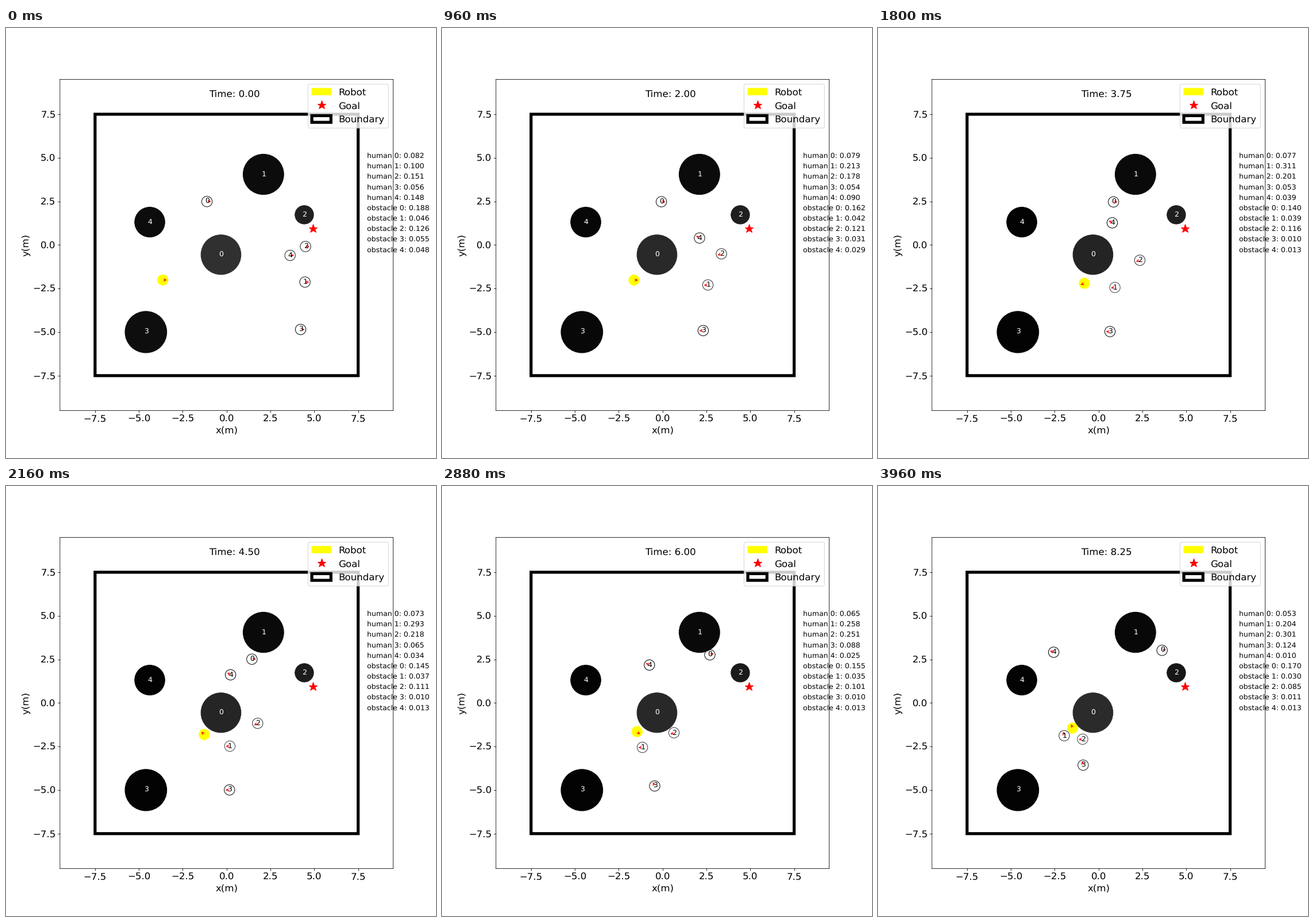
A matplotlib script that plays this animation: 748x748 px, repeating every 4080 ms.

```python
import numpy as np
import matplotlib.pyplot as plt
from matplotlib.animation import FuncAnimation
from matplotlib.lines import Line2D
from matplotlib.patches import ArrowStyle, Circle, FancyArrowPatch, Rectangle

FRAMES, INTERVAL, DT = 34, 120, 0.25
RADIUS = 0.3
LABEL_SHIFT = 0.11

# Steps at which the walkers' waypoints and the attention weights are given
TURNS = [0, 15, 21, 27, 33]
SCORE_STEPS = [0, 15, 33]

# The robot drives right, backs off, then hesitates beside obstacle 0
ROBOT_STEPS = [0, 13, 15, 18, 21, 27, 33]
ROBOT_PATH = [(-3.64, -2.01), (-0.37, -2.02), (-0.81, -2.2), (-1.27, -1.81),
              (-1.56, -1.54), (-1.35, -1.75), (-1.48, -1.44)]

# Waypoints in metres, then attention weights
HUMANS = [
    ([(-1.12, 2.49), (0.85, 2.47), (2.04, 2.55), (3.35, 2.97), (3.62, 3.02)],
     (.082, .077, .053)),
    ([(4.47, -2.13), (0.93, -2.44), (-0.56, -2.52), (-1.74, -2.58), (-1.96, -1.88)],
     (.100, .311, .204)),
    ([(4.50, -0.09), (2.35, -0.88), (1.19, -1.46), (0.11, -1.96), (-0.91, -2.08)],
     (.151, .201, .301)),
    ([(4.22, -4.85), (0.65, -4.97), (-0.32, -5.01), (-0.58, -4.52), (-0.88, -3.57)],
     (.056, .053, .124)),
    ([(3.62, -0.60), (0.78, 1.27), (-0.33, 1.96), (-1.17, 2.39), (-2.56, 2.91)],
     (.148, .039, .010)),
]

# x, y, radius, then attention weights
OBSTACLES = [
    ((-0.32, -0.56, 1.14), (.188, .140, .170)),
    ((2.10, 4.05, 1.16), (.046, .039, .030)),
    ((4.43, 1.73, 0.53), (.126, .116, .085)),
    ((-4.60, -5.00, 1.19), (.055, .010, .011)),
    ((-4.38, 1.31, 0.86), (.048, .013, .013)),
]


class Track:
    """Straight legs between waypoints."""

    def __init__(self, steps, points):
        self.steps = steps
        self.xs, self.ys = zip(*points)

    def position(self, step):
        return np.array([np.interp(step, self.steps, self.xs),
                         np.interp(step, self.steps, self.ys)])

    def heading(self, step):
        """Unit vector of the last move; everyone starts facing right."""
        if step == 0:
            return np.array([1.0, 0.0])
        move = self.position(step) - self.position(step - 1)
        return move / np.hypot(*move)


plt.rcParams["font.family"] = "DejaVu Sans"
plt.rcParams["text.hinting"] = "none"
fig, ax = plt.subplots(figsize=(10, 10), dpi=74.8)
fig.subplots_adjust(left=0.1255, right=0.9005, bottom=0.1105, top=0.8805)
ax.set(xlim=(-9.5, 9.5), ylim=(-9.5, 9.5))
ticks = np.arange(-7.5, 7.6, 2.5)
ax.set_xticks(ticks)
ax.set_yticks(ticks)
ax.tick_params(labelsize=16)
ax.set_xlabel("x(m)", fontsize=16)
ax.set_ylabel("y(m)", fontsize=16)

boundary = ax.add_patch(Rectangle((-7.5, -7.5), 15, 15, fill=False,
                                  edgecolor="black", linewidth=5))
goal = Line2D([4.91], [0.94], color="red", marker="*", linestyle="None",
              markersize=15)
ax.add_line(goal)
robot = ax.add_patch(Circle((0, 0), RADIUS, color="yellow"))
ax.legend([robot, goal, boundary], ["Robot", "Goal", "Boundary"],
          loc="upper right", fontsize=16)
clock = ax.text(-1, 8.5, "", fontsize=16)


def add_label(x, y, text, color):
    return ax.text(x - LABEL_SHIFT, y - LABEL_SHIFT, text, color=color,
                   fontsize=12)


def add_arrow():
    style = ArrowStyle("->", head_length=4, head_width=2)
    return ax.add_patch(FancyArrowPatch((0, 0), (1, 0), color="red",
                                        arrowstyle=style))


obstacles = []
for k, ((x, y, r), _) in enumerate(OBSTACLES):
    obstacles.append(ax.add_patch(Circle((x, y), r)))
    add_label(x, y, str(k), "white")

humans = [ax.add_patch(Circle((0, 0), RADIUS, fill=False)) for _ in HUMANS]
tags = [add_label(0, 0, str(k), "black") for k in range(len(HUMANS))]

tracks = [Track(ROBOT_STEPS, ROBOT_PATH)]
tracks += [Track(TURNS, points) for points, _ in HUMANS]
bodies = [robot] + humans
arrows = [add_arrow() for _ in tracks]

names = [f"{kind} {k}" for kind in ("human", "obstacle") for k in range(5)]
readouts = [ax.text(8, 5 - 0.6 * k, "", fontsize=12) for k in range(len(names))]
weights = [w for _, w in HUMANS + OBSTACLES]

# Keep edges at their true sub-pixel places
for artist in fig.findobj():
    artist.set_snap(False)


def update(step):
    clock.set_text(f"Time: {step * DT:.2f}")

    for body, arrow, track in zip(bodies, arrows, tracks):
        body.center = track.position(step)
        tip = body.center + RADIUS * track.heading(step)
        arrow.set_positions(body.center, tip)
    for human, tag in zip(humans, tags):
        tag.set_position(human.center - LABEL_SHIFT)

    scores = [np.interp(step, SCORE_STEPS, w) for w in weights]
    for name, readout, score in zip(names, readouts, scores):
        readout.set_text(f"{name}: {score:.3f}")
    for patch, score in zip(humans + obstacles, scores):
        patch.set_edgecolor((score,) * 3)
        patch.set_facecolor((score,) * 3)
    return []


anim = FuncAnimation(fig, update, frames=FRAMES, interval=INTERVAL,
                     init_func=lambda: update(0), repeat=True, repeat_delay=0)
plt.show()
```
